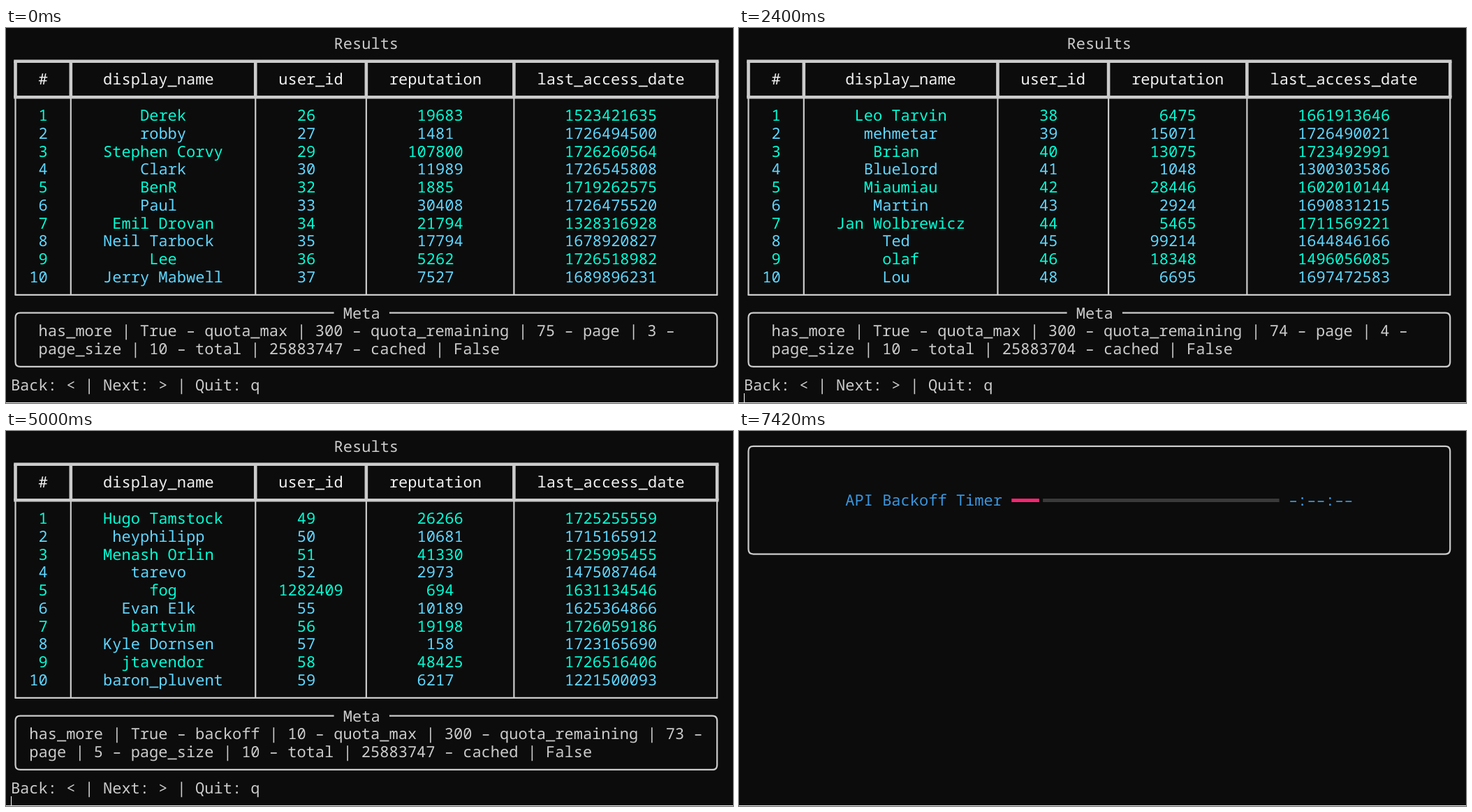
An HTML page for the animation above (8000 ms loop, 1041x538 px).

```html
<!DOCTYPE html>
<html lang="en">
<head>
<meta charset="utf-8">
<title>Paged results</title>
<style>
html, body { margin: 0; width: 100%; height: 100%; overflow: hidden; background: #0c0c0c; }
svg { display: block; }
text {
  font: 22.03px "Noto Sans Mono", "DejaVu Sans Mono", monospace;
  text-rendering: geometricPrecision;
  font-variant-ligatures: none;
  white-space: pre;
}
</style>
</head>
<body>
<svg width="1041" height="538" viewBox="0 0 1041 538">
  <g id="screen"></g>
  <rect id="cursor" x="7" y="524" width="1" height="13" fill="#fff"/>
  <rect y="537" width="1041" height="1" fill="#e6e6e6"/>
</svg>
<script>
const LOOP = 8000;
const CELL = 13.22, LINE = 25.78, LEFT = 6.9, TOP = 21.9;
const GREY = '#cccccc', WHITE = '#f2f2f2', MINT = '#00ffd7', SKY = '#5fd7ff', BLUE = '#3a96dd';
const HEAVY = 4.6, LIGHT = 2.2;
const HEADS = ['#', 'display_name', 'user_id', 'reputation', 'last_access_date'];

const pages = [
  {
    seps: [0, 6, 26, 38, 54, 76],
    rows: `Derek,26,19683,1523421635
robby,27,1481,1726494500
Stephen Corvy,29,107800,1726260564
Clark,30,11989,1726545808
BenR,32,1885,1719262575
Paul,33,30408,1726475520
Emil Drovan,34,21794,1328316928
Neil Tarbock,35,17794,1678920827
Lee,36,5262,1726518982
Jerry Mabwell,37,7527,1689896231`,
    metaCol: 3,
    meta: ['has_more | True – quota_max | 300 – quota_remaining | 75 – page | 3 –',
      'page_size | 10 – total | 25883747 – cached | False']
  },
  {
    seps: [0, 6, 27, 39, 54, 76],
    rows: `Leo Tarvin,38,6475,1661913646
mehmetar,39,15071,1726490021
Brian,40,13075,1723492991
Bluelord,41,1048,1300303586
Miaumiau,42,28446,1602010144
Martin,43,2924,1690831215
Jan Wolbrewicz,44,5465,1711569221
Ted,45,99214,1644846166
olaf,46,18348,1496056085
Lou,48,6695,1697472583`,
    metaCol: 3,
    meta: ['has_more | True – quota_max | 300 – quota_remaining | 74 – page | 4 –',
      'page_size | 10 – total | 25883704 – cached | False']
  },
  {
    seps: [0, 6, 26, 38, 54, 76],
    rows: `Hugo Tamstock,49,26266,1725255559
heyphilipp,50,10681,1715165912
Menash Orlin,51,41330,1725995455
tarevo,52,2973,1475087464
fog,1282409,694,1631134546
Evan Elk,55,10189,1625364866
bartvim,56,19198,1726059186
Kyle Dornsen,57,158,1723165690
jtavendor,58,48425,1726516406
baron_pluvent,59,6217,1221500093`,
    metaCol: 2,
    meta: ['has_more | True – backoff | 10 – quota_max | 300 – quota_remaining | 73 –',
      'page | 5 – page_size | 10 – total | 25883747 – cached | False']
  }
];

const colX = c => LEFT + c * CELL;
const midX = c => colX(c + 0.5);
const rowY = r => TOP + r * LINE;

function label(col, row, str, fill = GREY, extra = '') {
  const safe = str.replace(/</g, '&lt;').replace(/>/g, '&gt;');
  return `<text x="${colX(col)}" y="${rowY(row) + 8}" fill="${fill}" ${extra}>${safe}</text>`;
}

const stroke = (d, width, color = GREY) =>
  `<path d="${d}" fill="none" stroke="${color}" stroke-width="${width}" stroke-linecap="butt"/>`;

// Rounded panel; a gap of cells in its top edge leaves room for a title.
function panel(r0, r1, gap) {
  const x0 = midX(0), x1 = midX(76), y0 = rowY(r0), y1 = rowY(r1), k = 7;
  const [g0, g1] = gap ? gap.map(colX) : [500, 500];
  return stroke(`M${g1} ${y0}H${x1 - k}Q${x1} ${y0} ${x1} ${y0 + k}V${y1 - k}` +
    `Q${x1} ${y1} ${x1 - k} ${y1}H${x0 + k}Q${x0} ${y1} ${x0} ${y1 - k}V${y0 + k}` +
    `Q${x0} ${y0} ${x0 + k} ${y0}H${g0}`, LIGHT);
}

function tableRow(seps, row, cells, fill) {
  return cells.map((str, i) => {
    const room = seps[i + 1] - seps[i] - 1;
    const col = seps[i] + 1 + Math.floor((room - str.length) / 2);
    return label(col, row, str, fill);
  }).join('');
}

function resultsView({ seps, rows, metaCol, meta }) {
  const x0 = midX(0), x1 = midX(76), over = HEAVY / 2;
  let out = label(35, 0, 'Results', GREY, 'font-style="italic"');
  for (const s of seps) {
    out += stroke(`M${midX(s)} ${rowY(3)}V${rowY(14)}`, LIGHT);
    out += stroke(`M${midX(s)} ${rowY(1)}V${rowY(3)}`, HEAVY);
  }
  for (const r of [1, 3]) out += stroke(`M${x0 - over} ${rowY(r)}H${x1 + over}`, HEAVY);
  out += stroke(`M${x0 - 1} ${rowY(14)}H${x1 + 1}`, LIGHT);
  out += tableRow(seps, 2, HEADS, WHITE);
  rows.split('\n').forEach((line, i) => {
    out += tableRow(seps, 4 + i, [String(i + 1), ...line.split(',')], i % 2 ? SKY : MINT);
  });
  out += panel(15, 18, [35, 41]) + label(36, 15, 'Meta');
  meta.forEach((str, i) => { out += label(metaCol, 16 + i, str); });
  return out + label(0, 19, 'Back: < | Next: > | Quit: q');
}

function timerView(done) {
  const bar = (x0, x1, fill) =>
    `<rect x="${x0}" y="97" width="${x1 - x0}" height="5" fill="${fill}"/>`;
  const start = colX(29), filled = colX(29 + done);
  return panel(0, 6) + label(11, 3, 'API Backoff Timer', BLUE) +
    bar(done ? filled + 5.2 : start, colX(58), '#3a3a3a') +
    (done ? bar(start, filled, '#f92672') : '') +
    label(59, 3, '–:––:––', BLUE);
}

const scenes = [
  [0, () => resultsView(pages[0])],
  [2400, () => resultsView(pages[1])],
  [5000, () => resultsView(pages[2])],
  [6420, () => timerView(0)],
  [7420, () => timerView(3)]
];
const blinks = [1180, 1780, 2200, 2800, 3400, 4390, 4800, 5400, 6020, 6420];

const screenEl = document.getElementById('screen');
const cursor = document.getElementById('cursor');
let shown = -1;

function draw(t) {
  const scene = scenes.filter(([at]) => at <= t).length - 1;
  if (scene !== shown) {
    screenEl.innerHTML = scenes[scene][1]();
    shown = scene;
  }
  const on = blinks.filter(at => at <= t).length % 2;
  cursor.setAttribute('visibility', on ? 'visible' : 'hidden');
}

const origin = performance.now();
function tick() {
  draw((performance.now() - origin) % LOOP);
  requestAnimationFrame(tick);
}
tick();
</script>
</body>
</html>
```
